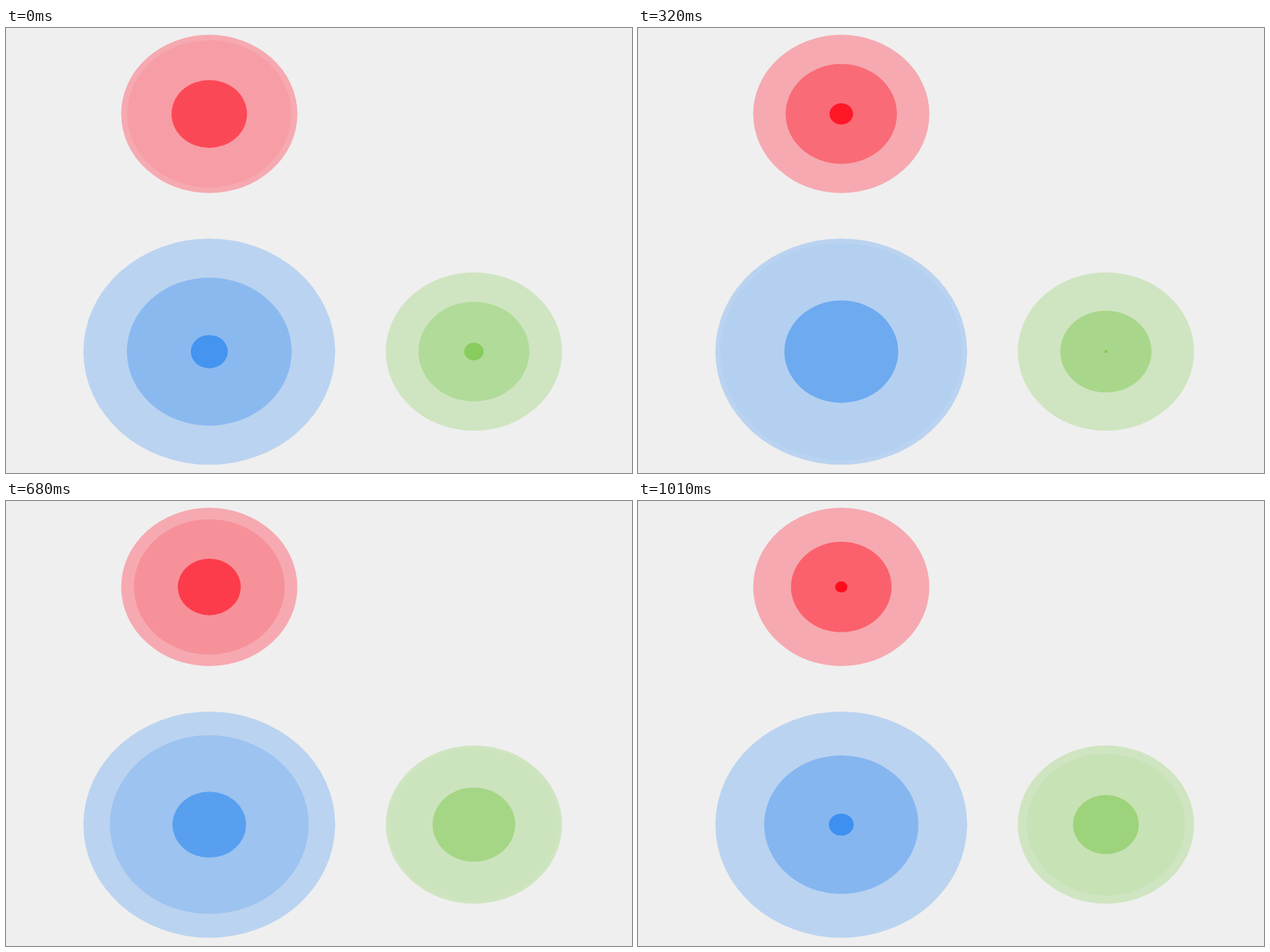
These frames come from a looping animation (813 px wide and 579 px high, 1110 ms). An HTML page with a canvas:

```html
<!DOCTYPE html>
<html lang="en">
<head>
<meta charset="utf-8">
<title>Pulsing dots</title>
<style>
html, body { margin: 0; width: 100%; height: 100%; overflow: hidden; background: #efefef; }
canvas { display: block; width: 813px; height: 579px; }
</style>
</head>
<body>
<canvas id="stage" width="813" height="579"></canvas>
<script>
const ctx = document.getElementById('stage').getContext('2d');
const LOOP = 1110;
const SQUASH = 0.9;

// Moments at which the picture steps forward.
const steps = [0, 40, 90, 130, 180, 220, 270, 320, 360, 410, 460, 500,
  530, 580, 630, 680, 730, 780, 830, 880, 920, 970, 1010];

// speed is in px per ms; births are the times at which rings leave the centre.
const pulses = [
  { x: 264, y: 111.8, max: 114.4, speed: 0.0726, from: [255, 0, 18], to: [246, 169, 176],
    births: [-1467, -675, 110, 900] },
  { x: 264, y: 421.1, max: 163.5, speed: 0.156, from: [48, 137, 240], to: [186, 211, 240],
    births: [-686, -154, 368, 907] },
  { x: 607.7, y: 421, max: 114.5, speed: 0.1455, from: [127, 201, 82], to: [207, 229, 193],
    births: [-495, -87, 305, 716] }
];

function mix(a, b, p) {
  return `rgb(${a.map((v, i) => Math.round(v + (b[i] - v) * p)).join(',')})`;
}

function disc(x, y, r, color) {
  ctx.fillStyle = color;
  ctx.beginPath();
  ctx.ellipse(x, y, r, r * SQUASH, 0, 0, Math.PI * 2);
  ctx.fill();
}

function clockAt(time) {
  let i = steps.length - 1;
  while (steps[i] > time) i--;
  // The second half advances at an even pace.
  return i > 12 ? 530 + 48 * (i - 12) : steps[i];
}

function draw(time) {
  const clock = clockAt(time);
  ctx.fillStyle = '#efefef';
  ctx.fillRect(0, 0, 813, 579);
  for (const p of pulses) {
    disc(p.x, p.y, p.max, mix(p.to, p.to, 0));
    for (const birth of p.births) {
      const r = (clock - birth) * p.speed;
      if (r > 0 && r < p.max) disc(p.x, p.y, r, mix(p.from, p.to, r / p.max));
    }
  }
}

const start = performance.now();
function tick() {
  draw((performance.now() - start) % LOOP);
  requestAnimationFrame(tick);
}
tick();
</script>
</body>
</html>
```
